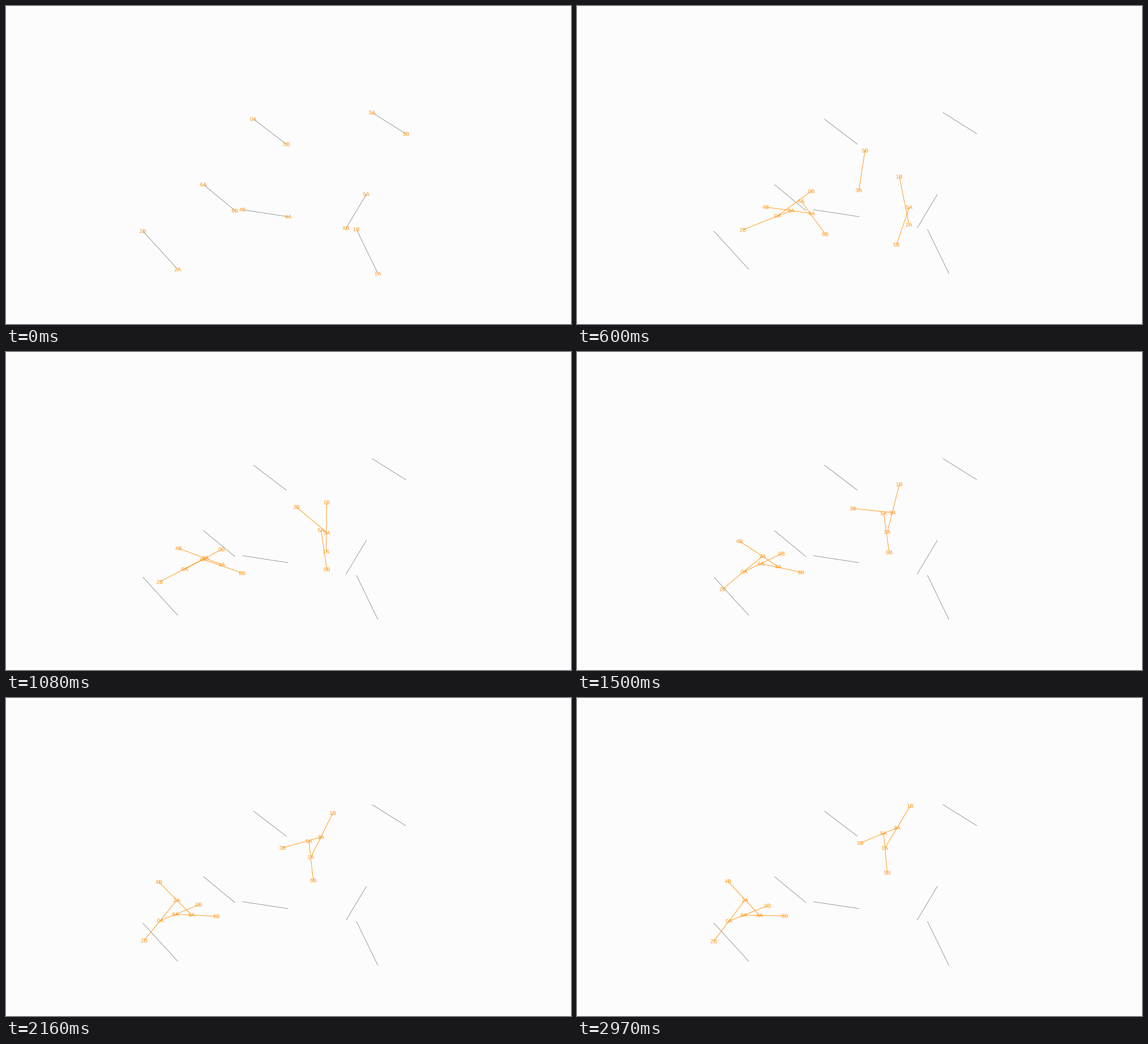
Recreate the animation shown at these times as a matplotlib script. Size 998 px wide and 561 px high, loop 3600 ms.

```python
import numpy as np
import matplotlib.pyplot as plt
from matplotlib.animation import FuncAnimation
from matplotlib.patches import PathPatch
from matplotlib.textpath import TextPath
from matplotlib.transforms import Affine2D

W, H, DPI = 998, 561, 64
FRAMES, STEP = 120, 30
SWING, GATHER = 20, 36      # frames at which the rods have swung in and met
PX = 72 / DPI
PAPER, GREY, ORANGE = "#fcfcfc", "#747474", "#ff930f"


def aim(a):
    """Direction from every A end to the A end of the next rod in the ring."""
    d = np.roll(a, -1, axis=-2) - a
    return np.arctan2(d[..., 1], d[..., 0])


def pose(a, angle):
    return np.concatenate([a, angle[..., None]], axis=-1)


def track(rods, lag, span, power, sway):
    """Poses (x, y, angle of end A) per frame for a ring of rigid rods.

    Each rod lists A and B at the start, then A when swung in, gathered and
    at rest. Lag is how far, in degrees, a rod is off its aim when swung in
    and gathered.
    """
    a0, b0, a1, a2, a3 = np.array(rods, float).transpose(1, 0, 2)
    lag1, lag2 = np.radians(lag)
    arm = b0 - a0

    # Ease out to rest, each rod leaning on the next one.
    u = np.minimum(np.arange(FRAMES - GATHER) / span, 1)[:, None, None]
    left = (1 - u) ** power
    a = a3 + (a2 - a3) * left + u * (1 - u) ** 1.5 * np.array([sway, 0])
    late = pose(a, aim(a) + lag2 * left[..., 0])

    keys = np.concatenate([[pose(a0, np.arctan2(arm[:, 1], arm[:, 0])),
                            pose(a1, aim(a1) + lag1)], late])
    keys[..., 2] = np.unwrap(keys[..., 2], axis=0)
    p0, p1, late = keys[0], keys[1], keys[2:]

    # Swing in on a parabola, then blend into the settling motion.
    gap = GATHER - SWING
    v1, v2 = (p1 - p0) / SWING, (late[0] - p1) / gap
    bend = (v2 - v1) / GATHER
    t = np.arange(SWING)[:, None, None]
    swing = p0 + v1 * t + bend * t * (t - SWING)

    s = np.arange(gap)[:, None, None] / gap
    m, n = (v1 + bend * SWING) * gap, (late[1] - late[0]) * gap
    blend = (p1 + (late[0] - p1) * s * s * (3 - 2 * s)
             + m * s * (1 - s) ** 2 - n * s * s * (1 - s))
    return np.concatenate([swing, blend, late]), np.hypot(*arm.T)


def ends(poses, length):
    x, y, a = np.moveaxis(poses, -1, 0)
    return np.stack([np.stack([x, y], -1),
                     np.stack([x + length * np.cos(a),
                               y + length * np.sin(a)], -1)], axis=-2)


lower = track(
    [[(437, 199.5), (495.5, 244), (354.5, 370), (316, 383), (268.5, 393.5)],
     [(348.7, 315), (404.5, 361), (396, 344), (349, 366), (295, 383)],
     [(498.5, 371.7), (417.3, 359.3), (414.5, 366), (381.5, 375), (322.5, 383.5)],
     [(303.5, 464.7), (241.7, 397), (378.5, 361), (352.5, 363), (297, 356)]],
    lag=[(-4, 4, 0, -1), (-1, 4, -2, 1)], span=46, power=1.6, sway=0)
upper = track(
    [[(657, 472), (619, 394), (586.5, 386), (565.5, 352), (544, 264.5)],
     [(646.5, 188), (706.5, 225.5), (498, 325), (567, 319), (565.5, 228.8)],
     [(636.7, 332), (600.7, 392), (587, 355), (556.5, 314.5), (541.7, 238.7)]],
    lag=[(44, -100, 18), (-2, 17, 5)], span=63, power=2, sway=-58)

paths = np.empty((FRAMES, 7, 2, 2))
paths[:, [0, 6, 4, 2]] = ends(*lower)
paths[:, [1, 3, 5]] = ends(*upper)

fig = plt.figure(figsize=(W / DPI, H / DPI), dpi=DPI, facecolor=PAPER)
ax = fig.add_axes([0, 0, 1, 1])
ax.set(xlim=(0, W), ylim=(H, 0))
ax.axis("off")


def add_line(color, width, z):
    return ax.plot([], [], color=color, lw=width * PX, snap=False,
                   solid_capstyle="butt", zorder=z)[0]


def add_label(text):
    path = TextPath((0, 0), text, size=9.5, prop={"family": "Liberation Sans"})
    box = path.get_extents()
    flip = Affine2D().translate(-(box.x0 + box.x1) / 2,
                                -(box.y0 + box.y1) / 2).scale(1, -1)
    return ax.add_patch(PathPatch(flip.transform_path(path), fc=ORANGE, lw=0,
                                  snap=False, zorder=3))


for rod in paths[0]:
    add_line(GREY, 0.7, 1).set_data(*rod.T)
bars = [add_line(ORANGE, 0.9, 2) for _ in range(7)]
labels = [[add_label(f"{i}{end}") for end in "AB"] for i in range(7)]


def draw(frame):
    for rod, bar, pair in zip(paths[frame], bars, labels):
        bar.set_data(*rod.T)
        bar.set_visible(frame > 0)
        for label, (x, y) in zip(pair, rod):
            label.set_transform(Affine2D().translate(x, y) + ax.transData)
    return bars + sum(labels, [])


anim = FuncAnimation(fig, draw, frames=FRAMES, interval=STEP,
                     repeat=True, repeat_delay=0)
plt.show()
```
